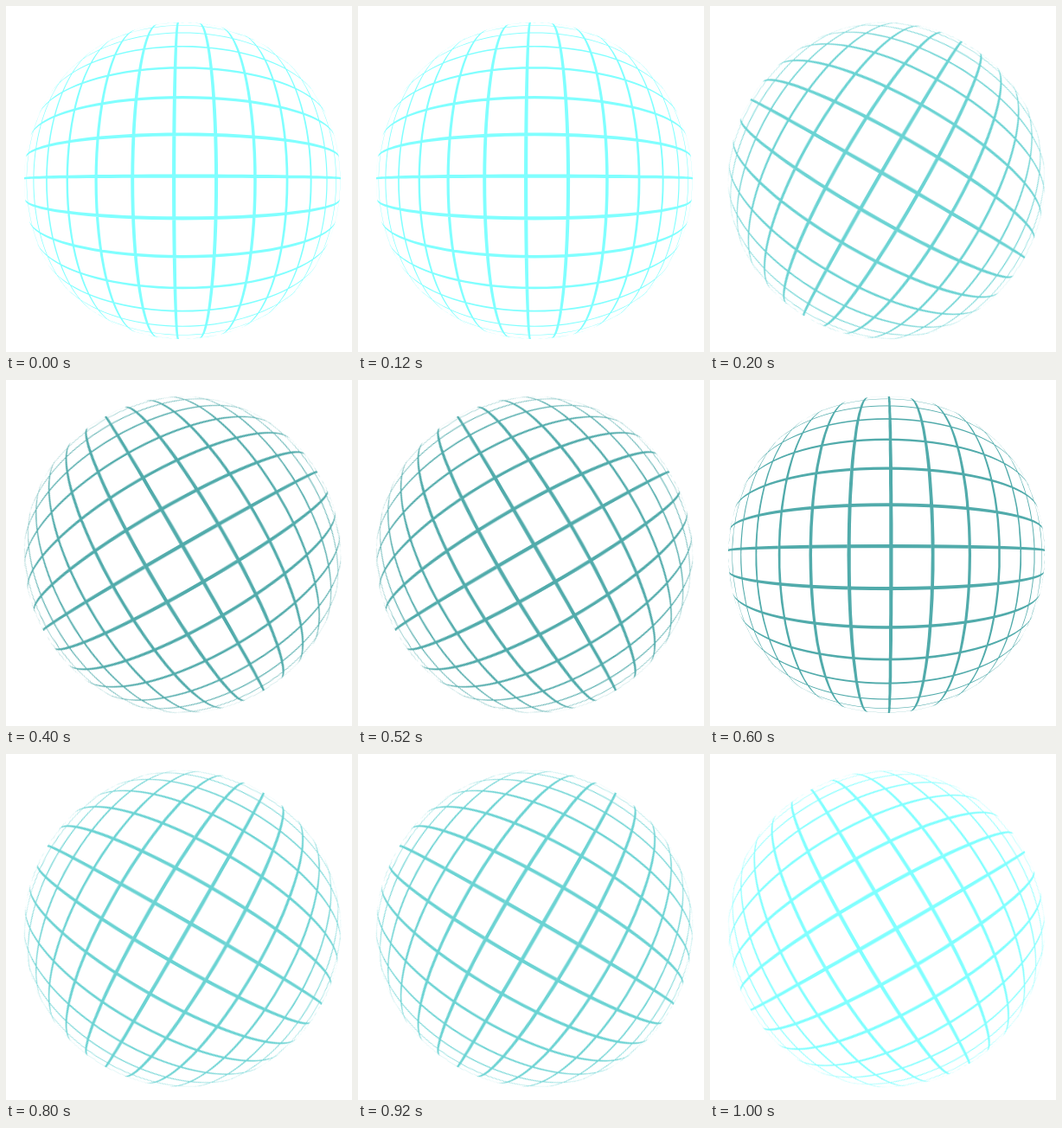
Recreate the animation shown at these times as an HTML page. Size 400 by 400 pixels, loop 1.2 s.

```html
<!DOCTYPE html>
<html lang="en">
<head>
<meta charset="utf-8">
<title>Turning wire globe</title>
<style>
  html, body { margin: 0; width: 100%; height: 100%; overflow: hidden; background: #fff; }
  svg { display: block; width: 100%; height: 100%; }
  #globe { fill: currentColor; color: #80ffff; transform-origin: 204px 202px; }
</style>
</head>
<body>
<svg viewBox="0 0 400 400"><path id="globe"/></svg>
<script>
const CX = 204, CY = 202, R = 183;
const GAP = 0.27, WIDTH = 0.023;       // grid units, rim at distance 2
const OFFSET_U = -0.054, OFFSET_V = -0.0295;
const SEGMENTS = 64;

// Wrap a flat grid point onto the sphere (inverse stereographic), seen from the front.
function wrap(u, v) {
  const k = R / (1 + (u * u + v * v) / 4);
  return (CX + u * k).toFixed(2) + ' ' + (CY + v * k).toFixed(2);
}

// One edge of a grid line, from rim to rim.
function edge(c, upright) {
  const half = Math.sqrt(Math.max(0, 4 - c * c));
  return Array.from({ length: SEGMENTS + 1 }, (_, i) => {
    const t = -half * Math.cos(Math.PI * i / SEGMENTS);
    return upright ? wrap(c, t) : wrap(t, c);
  });
}

// Both directions wind the same way, so crossings stay filled.
function band(c, upright) {
  const h = (upright ? WIDTH : -WIDTH) / 2;
  const near = edge(c - h, upright);
  const far = edge(c + h, upright).reverse();
  return 'M' + near.concat(far).join('L') + 'Z';
}

let d = '';
for (let i = -7; i <= 7; i++) {
  d += band(OFFSET_U + i * GAP, true) + band(OFFSET_V + i * GAP, false);
}

const globe = document.getElementById('globe');
globe.setAttribute('d', d);

const shades = ['#80ffff', '#6bd3d3', '#51abab', '#51abab', '#6bd3d3', '#80ffff'];
const poses = shades.map((color, i) => ({
  offset: i / shades.length,
  transform: `rotate(${i * 30}deg)`,
  color,
  easing: 'step-end'
}));
poses.push({ ...poses[shades.length - 1], offset: 1 });

globe.animate(poses, { duration: 1200, iterations: Infinity });
</script>
</body>
</html>
```
